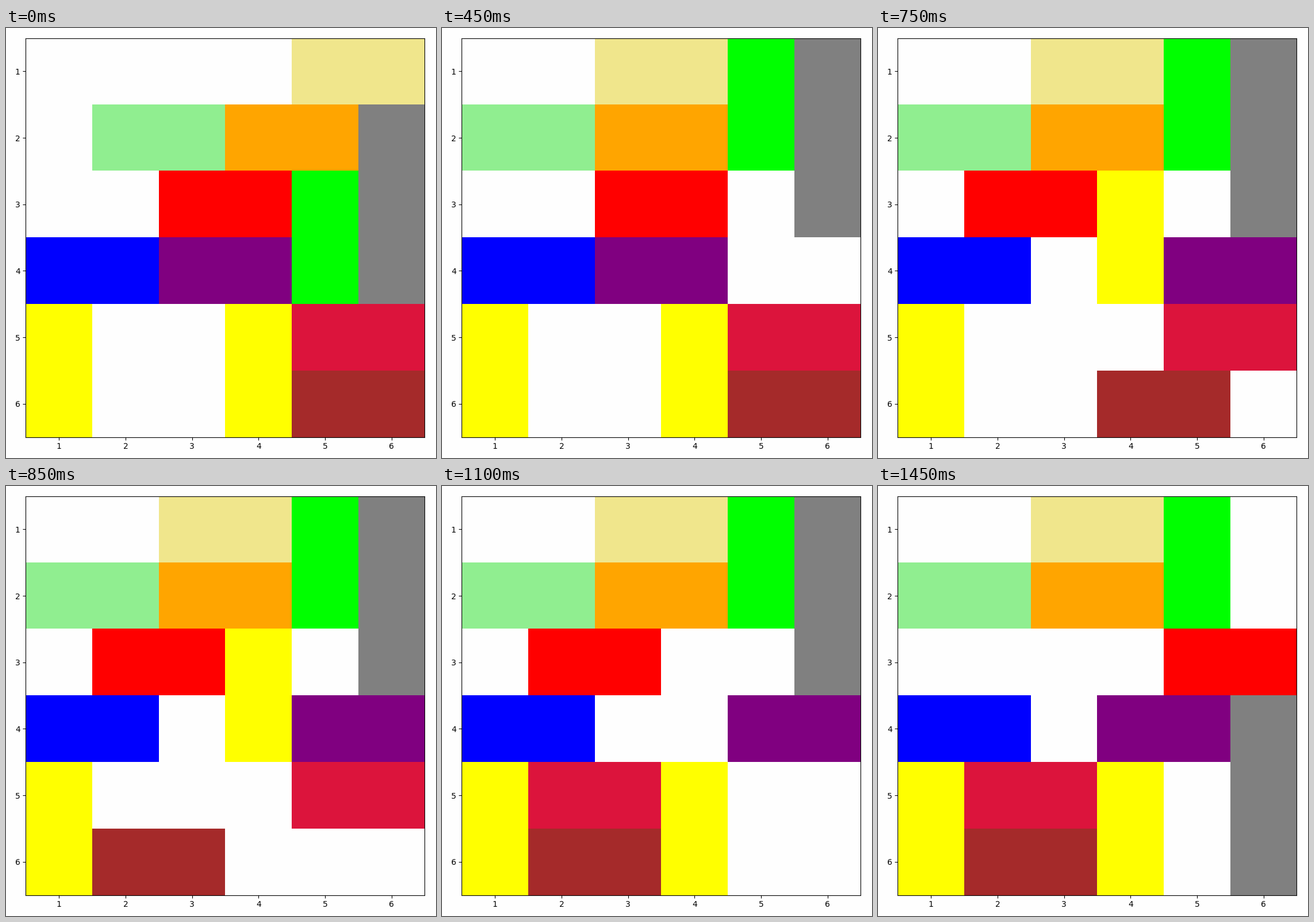
Write a matplotlib script that moves like this. It is 748 px wide and 748 px high and loops after 1500 ms.

```python
import matplotlib.pyplot as plt
from matplotlib.animation import FuncAnimation
from matplotlib.patches import Rectangle

SIZE, DPI = 748, 100
FRAMES, INTERVAL = 30, 50
HOLD = 2  # frames of rest after the first one
PAPER = "#fefefe"

# Pixel borders of the six columns and rows
X_EDGES = [34, 150, 266, 381, 497, 613, 728]
Y_EDGES = [18, 133, 248, 364, 480, 596, 712]

# name: colour, column, row, width, height (in cells)
CARS = {
    "khaki": ("khaki", 4, 0, 2, 1),
    "mint": ("lightgreen", 1, 1, 2, 1),
    "orange": ("orange", 3, 1, 2, 1),
    "truck": ("gray", 5, 1, 1, 3),
    "red": ("red", 2, 2, 2, 1),
    "lime": ("lime", 4, 2, 1, 2),
    "blue": ("blue", 0, 3, 2, 1),
    "purple": ("purple", 2, 3, 2, 1),
    "left yellow": ("yellow", 0, 4, 1, 2),
    "yellow": ("yellow", 3, 4, 1, 2),
    "crimson": ("crimson", 4, 4, 2, 1),
    "brown": ("brown", 4, 5, 2, 1),
}

LEFT, RIGHT, UP, DOWN = (-1, 0), (1, 0), (0, -1), (0, 1)

# One cell per frame
MOVES = [
    ("khaki", LEFT, 2),
    ("mint", LEFT, 1),
    ("orange", LEFT, 1),
    ("lime", UP, 2),
    ("truck", UP, 1),
    ("purple", RIGHT, 2),
    ("yellow", UP, 1),
    ("red", LEFT, 1),
    ("yellow", UP, 1),
    ("brown", LEFT, 3),
    ("crimson", LEFT, 3),
    ("yellow", DOWN, 2),
    ("purple", LEFT, 1),
    ("truck", DOWN, 3),
    ("red", RIGHT, 3),
]
STEPS = [(name, way) for name, way, count in MOVES for _ in range(count)]


def positions(frame):
    """Column and row of every car at the given frame."""
    cells = {name: car[1:3] for name, car in CARS.items()}
    for name, (dx, dy) in STEPS[:max(0, frame - HOLD)]:
        col, row = cells[name]
        cells[name] = (col + dx, row + dy)
    return cells


fig = plt.figure(figsize=(SIZE / DPI, SIZE / DPI), dpi=DPI, facecolor=PAPER)

# Pixel canvas for the cars, below the framed axes
canvas = fig.add_axes([0, 0, 1, 1], zorder=0)
canvas.set_xlim(0, SIZE)
canvas.set_ylim(SIZE, 0)
canvas.axis("off")

left, top, side = 34.4, 17.55, 694
frame_box = [left / SIZE, 1 - (top + side) / SIZE, side / SIZE, side / SIZE]
board = fig.add_axes(frame_box, zorder=1, facecolor="none")
board.set_xlim(0.5, 6.5)
board.set_ylim(6.5, 0.5)
board.set_xticks(range(1, 7))
board.set_yticks(range(1, 7))

patches = {
    name: canvas.add_patch(
        Rectangle((0, 0), 1, 1, facecolor=car[0], linewidth=0, antialiased=False))
    for name, car in CARS.items()
}


def draw(frame):
    for name, (col, row) in positions(frame).items():
        _, _, _, width, height = CARS[name]
        x0, x1 = X_EDGES[col], X_EDGES[col + width]
        y0, y1 = Y_EDGES[row], Y_EDGES[row + height]
        patches[name].set_bounds(x0, y0, x1 - x0, y1 - y0)
    return list(patches.values())


anim = FuncAnimation(fig, draw, frames=FRAMES, interval=INTERVAL,
                     init_func=lambda: draw(0), repeat=True, repeat_delay=0)
plt.show()
```
